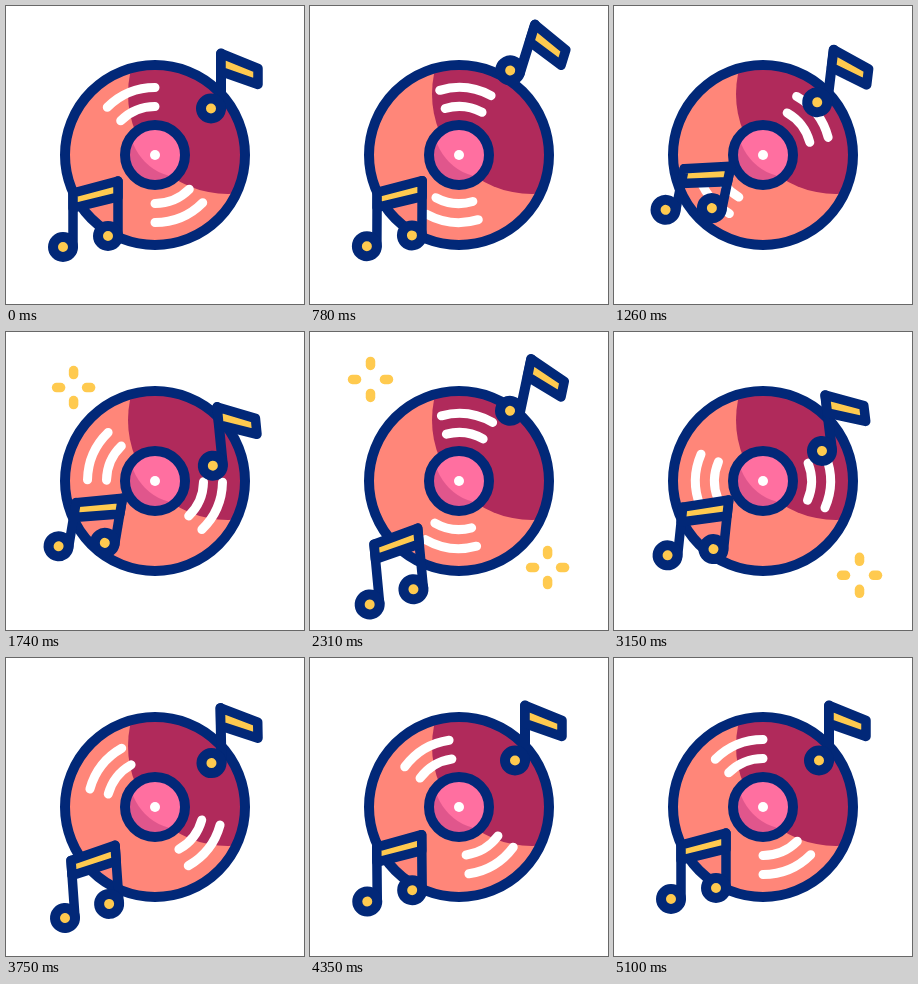
These frames come from a looping animation (298 by 298 pixels, 5.4 s). An HTML page with a canvas:

```html
<!DOCTYPE html>
<html>
<head>
<meta charset="utf-8">
<title>Spinning record</title>
<style>
  html, body { margin: 0; width: 100%; height: 100%; overflow: hidden; background: #fff; }
  canvas { display: block; }
</style>
</head>
<body>
<canvas id="stage" width="298" height="298"></canvas>
<script>
const ctx = document.getElementById('stage').getContext('2d');
const NAVY = '#022878', YELLOW = '#ffca4f', CORAL = '#ff8679', WINE = '#b02a5b',
      PINK = '#ff6fa0', ROSE = '#e0568c';
const LOOP = 5400, SPIN = 5100, CENTER = 149, RAD = Math.PI / 180;

// Keys: time, head x, head y, tilt in degrees, stem length
const SINGLE = [
  [0, 205, 102.5, 0, 55], [880, 200, 63, 18, 51], [1680, 207, 135, -6, 58],
  [2340, 200, 78.5, 12, 55], [3120, 208, 119, -7, 55], [3960, 205, 102.5, 0, 55]
];
const DOUBLE = [
  [720, 57, 241, 0, 54], [1500, 50, 193, 15, 41], [2220, 60, 275, -6, 60],
  [2940, 52.5, 216, 8, 48], [3750, 59, 260, -4, 57], [4530, 57, 241, 0, 54]
];

const clamp = v => Math.min(1, Math.max(0, v));
const smooth = p => p * p * (3 - 2 * p);

// Cubic bezier easing through (x1, 0) and (x2, 1)
function bezier(p, x1, x2) {
  let lo = 0, hi = 1;
  for (let i = 0; i < 24; i++) {
    const s = (lo + hi) / 2, r = 1 - s;
    if (3 * x1 * s * r * r + 3 * x2 * s * s * r + s ** 3 < p) lo = s; else hi = s;
  }
  return smooth(lo);
}

function pose(keys, t) {
  let i = 0;
  while (i < keys.length - 2 && t > keys[i + 1][0]) i++;
  const a = keys[i], b = keys[i + 1];
  const p = smooth(clamp((t - a[0]) / (b[0] - a[0])));
  return a.slice(1).map((v, k) => v + (b[k + 1] - v) * p);
}

function paint(fill, stroke, width) {
  if (fill) { ctx.fillStyle = fill; ctx.fill(); }
  if (stroke) { ctx.strokeStyle = stroke; ctx.lineWidth = width; ctx.stroke(); }
}

function circle(x, y, r, fill, stroke, width) {
  ctx.beginPath();
  ctx.arc(x, y, r, 0, 7);
  paint(fill, stroke, width);
}

function poly(points, fill, stroke, width) {
  ctx.beginPath();
  points.forEach(p => ctx.lineTo(...p));
  if (fill) ctx.closePath();
  paint(fill, stroke, width);
}

// Fills a disc and lays a second, offset disc inside it
function twoTone(r, base, x, y, shadeRadius, shade) {
  circle(0, 0, r, base);
  ctx.save();
  ctx.clip();
  circle(x, y, shadeRadius, shade);
  ctx.restore();
  circle(0, 0, r, null, NAVY, 10);
}

function record(t) {
  ctx.save();
  ctx.translate(CENTER, CENTER);
  twoTone(90, CORAL, 73, -61, 100, WINE);
  ctx.save();
  ctx.rotate(2 * Math.PI * bezier(clamp(t / SPIN), 0.33, 0.42));
  for (const turn of [0, 180]) {
    for (const r of [67.5, 48.5]) {
      ctx.beginPath();
      ctx.arc(0, 0, r, (turn - 135) * RAD, (turn - 90) * RAD);
      paint(null, '#fff', 9);
    }
  }
  ctx.restore();
  twoTone(30, ROSE, 29, -32, 55, PINK);
  circle(0, 0, 5, '#fff');
  ctx.restore();
}

function note(keys, t, draw) {
  const [x, y, tilt, stem] = pose(keys, t);
  ctx.save();
  ctx.translate(x, y);
  ctx.rotate(tilt * RAD);
  draw(stem);
  ctx.restore();
}

const head = (x, y) => circle(x, y, 10, YELLOW, NAVY, 10);

function singleNote(stem) {
  poly([[10, 0], [10, -stem]], null, NAVY, 10);
  poly([[10, -stem], [47, 15 - stem], [47, 24 + 7 - stem], [10, 18 - stem]], YELLOW, NAVY, 9.5);
  head(0, 0);
}

function doubleNote(stem) {
  poly([[10, 0], [10, -stem]], null, NAVY, 9.5);
  poly([[55, -11], [55, -stem - 12]], null, NAVY, 9.5);
  poly([[10, -stem], [55, -stem - 12], [55, 4 - stem], [10, 15 - stem]], YELLOW, NAVY, 9.5);
  head(0, 0);
  head(45, -11);
}

// Four dashes that drift outwards from behind the record
function sparkle(t, start, dx, dy) {
  const p = (t - start) / 1500;
  if (p <= 0 || p >= 1) return;
  const out = 1 - (1 - p) ** 5, dist = 85 + 50 * out;
  const size = Math.min(1, p / 0.2, (1 - p) / 0.15);
  ctx.save();
  ctx.translate(CENTER + dx * dist, CENTER + dy * dist);
  for (let i = 0; i < 4; i++) {
    ctx.rotate(Math.PI / 2);
    const r = 11.5 + 4.5 * out;
    poly([[r - 2 * size, 0], [r + 2 * size, 0]], null, YELLOW, 9.5 * size);
  }
  ctx.restore();
}

function frame(now) {
  const t = now % LOOP;
  ctx.fillStyle = '#fff';
  ctx.fillRect(0, 0, 298, 298);
  ctx.lineCap = ctx.lineJoin = 'round';
  sparkle(t, 1350, -0.657, -0.754);
  sparkle(t, 1920, 0.715, 0.699);
  record(t);
  note(SINGLE, t, singleNote);
  note(DOUBLE, t, doubleNote);
}

let begin;
function tick(now) {
  begin ??= now;
  frame(now - begin);
  requestAnimationFrame(tick);
}
frame(0);
requestAnimationFrame(tick);
</script>
</body>
</html>
```
